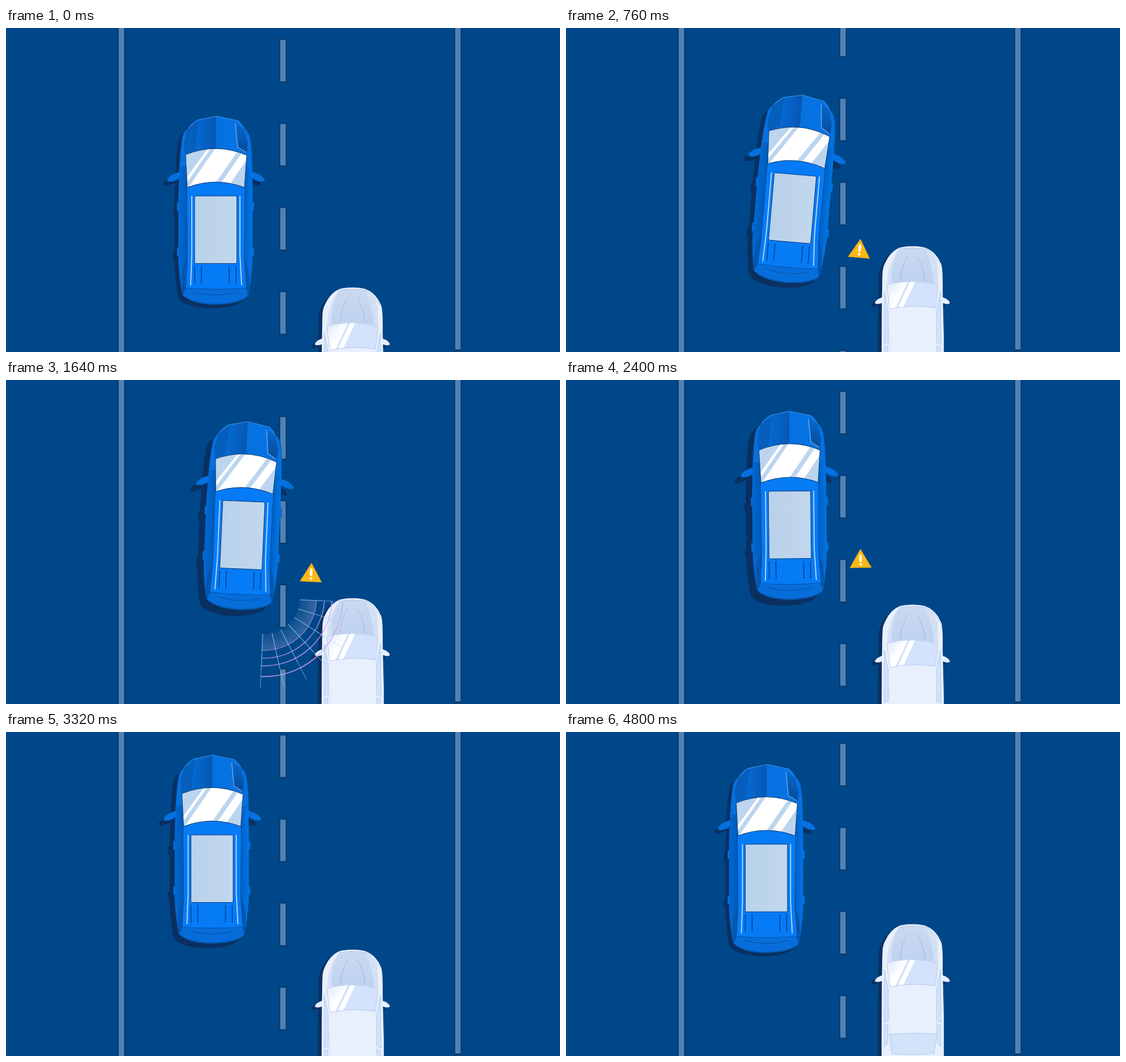
Animation of 978x573 px, one loop 4840 ms. Source, as an HTML page:

```html
<!DOCTYPE html>
<html lang="en">
<head>
<meta charset="utf-8">
<title>Lane warning</title>
<style>
html, body { margin: 0; width: 100%; height: 100%; overflow: hidden; background: #004789; }
svg { display: block; width: 978px; height: 573px; }
</style>
</head>
<body>
<svg viewBox="0 0 978 573" xmlns="http://www.w3.org/2000/svg">
  <defs>
    <linearGradient id="hoodL"><stop offset="0" stop-color="#0872e2"/><stop offset=".35" stop-color="#0569d2"/><stop offset="1" stop-color="#0558b4"/></linearGradient>
    <linearGradient id="hoodR"><stop offset="0" stop-color="#0670de"/><stop offset="1" stop-color="#0875e8"/></linearGradient>
    <linearGradient id="lamp" x1="0" y1="0" x2="0" y2="1"><stop offset="0" stop-color="#0768cf"/><stop offset="1" stop-color="#064b96"/></linearGradient>
    <linearGradient id="side"><stop offset="0" stop-color="#0069d4"/><stop offset=".13" stop-color="#0058b4"/><stop offset=".87" stop-color="#005cbc"/><stop offset="1" stop-color="#0074e6"/></linearGradient>
    <linearGradient id="glass"><stop offset="0" stop-color="#b8d1ea"/><stop offset="1" stop-color="#c1d7ed"/></linearGradient>
    <linearGradient id="bonnet" x1="0" y1="0" x2="0" y2="1"><stop offset="0" stop-color="#cad9f1"/><stop offset="1" stop-color="#bfd2ee"/></linearGradient>
    <linearGradient id="shine" x1="0" y1="0" x2=".55" y2=".55"><stop offset=".15" stop-color="#d6e4fb"/><stop offset="1" stop-color="#fff"/></linearGradient>
    <clipPath id="screen"><path d="M317 224Q371 202 425 225L421 282Q370 263 320 282Z"/></clipPath>
    <clipPath id="screen2"><path d="M566 408Q612 396 657 409L652 449Q612 442 572 451Z"/></clipPath>

    <path id="mirror" d="M317 247C313 254 306 254 299 257C289 260 283 268 285 271C293 274 305 268 309 263L318 261Z"/>
    <path id="body" d="M371 155.500L338 162Q325 169 321 178Q314 182 311 194Q307 220 306 250L304.500 300V410Q306 446 312 472Q326 488 369 489Q413 488 427 474Q433 447 435 410V300L434.500 250Q435 217 431 194Q428 182 421 178Q418 169 410 164Z"/>
    <path id="nub" d="M302 308h4v15h-4zM302 388h4v15h-4zM434 308h4v15h-4zM434 388h4v15h-4z"/>
    <g id="shape">
      <use href="#body"/><use href="#mirror"/><use href="#nub"/>
      <use href="#mirror" transform="translate(741.400) scale(-1 1)"/>
    </g>

    <path id="mirror2" d="M561 430C552 432 545 437 546 441C552 443 557 440 561 439Z"/>
    <path id="body2" d="M590 342.500Q612 338 633 342.500Q653 349 662 372Q665 380 664.500 420L666.500 500L667 700H557L558 440L559 391Q559 378 564 369Q573 349 590 342.500Z"/>
    <g id="shape2">
      <use href="#body2"/><use href="#mirror2"/>
      <use href="#mirror2" transform="translate(1223) scale(-1 1)"/>
    </g>
  </defs>

  <rect width="978" height="573" fill="#004789"/>
  <g fill="#5083b5" stroke="#0d3768" stroke-width="2">
    <rect x="198" y="-5" width="11.500" height="585"/>
    <rect x="792" y="-5" width="11.500" height="574.500"/>
    <g id="dashes"></g>
  </g>

  <g id="white">
    <use href="#shape2" x="-7" y="5" fill="#0a3062"/>
    <use href="#shape2" fill="#e8effd" stroke="#f3f7fe" stroke-width=".8"/>
    <path d="M588 345Q612 341 636 345Q650 353 656 372L657 409Q612 396 567 408L568 391Q574 362 588 345Z" fill="#d3e0f4"/>
    <path d="M588 345Q612 341 634 345Q646 370 650 406Q612 397 575 405Q573 374 588 345Z" fill="url(#bonnet)"/>
    <path d="M588 345Q612 341 636 345Q650 352 659 370" fill="none" stroke="#b2c8e8"/>
    <path d="M603 358Q591 378 590 402M620 358Q632 378 634 402" fill="none" stroke="#9fb9df"/>
    <g clip-path="url(#screen2)">
      <path d="M560 395h110v60h-110z" fill="#d3e2fd"/>
      <path d="M560 395h47l-28 60h-19z" fill="url(#shine)"/>
      <path d="M611 395h9l-28 60h-9z" fill="#fff"/>
    </g>
    <g stroke="#a9c3e8" stroke-width=".8" fill="#d2e2f9">
      <path d="M566 408Q612 396 657 409L652 449Q612 442 572 451Z" fill="none"/>
      <path d="M562 420L569 457V510L562 514ZM661 420L654 457V510L662 514ZM562 518L568 516V550L562 557ZM661 518L655 516V550L662 557Z"/>
      <path d="M571 535Q612 531 654 534L650 568Q612 573 575 569Z"/>
      <path d="M569 457L571 535M654 457V534" fill="none" stroke="#ccdcf3"/>
    </g>
  </g>

  <use id="shadow" href="#shape" fill="#0a3062"/>
  <g id="blue">
    <use href="#shape" fill="#0570df" stroke="#07549f" stroke-width=".8"/>
    <path d="M306 245L304.500 300V410Q306 446 312 472L427 474Q433 446 435 410V300L434.500 245Z" fill="url(#side)"/>
    <path d="M338 163L371 155.500V214Q345 214 318 224L315 203L322 178Z" fill="url(#hoodL)"/>
    <path d="M371 155.500L410 164L421 178L427 205L425 225Q397 214 371 214Z" fill="url(#hoodR)"/>
    <path d="M338 165L333 215L317 222L315 203L322 178Z" fill="#075fbd" stroke="#054d9b" stroke-width=".7"/>
    <path d="M405 168L409 212L425 222L427 204L420 178Z" fill="url(#lamp)"/>
    <path d="M405 169L409 211L424 220" fill="none" stroke="#78b5f4" stroke-width="1.200"/>
    <path d="M321 178L338 163L371 156L410 164L421 178" fill="none" stroke="#4f9eee" stroke-width=".8"/>
    <path d="M319 278Q370 263 422 278L421 410L425 462H317L320 410Z" fill="#057bf6" stroke="#064d9c"/>
    <g clip-path="url(#screen)">
      <path d="M310 205h120v85h-120z" fill="#fff"/>
      <path d="M310 205h52L310 277zM367 205h8L322 282h-9zM418 205h9L373 284h-10zM444 205L386 290H444z" fill="#bcd5ef"/>
    </g>
    <path d="M317 224Q371 202 425 225L421 282Q370 263 320 282Z" fill="none" stroke="#0a3568"/>
    <path d="M328 297V400L326 455M413 297V400L416 455" fill="none" stroke="#b9dcff" stroke-width="1.800"/>
    <rect x="333" y="297" width="74.500" height="119.500" rx="2" fill="url(#glass)" stroke="#0b3a74"/>
    <path d="M333 421V452M345 421V452M394 421V452M406 421V452" stroke="#064088" stroke-width="1.500"/>
    <path d="M319 410L317 458L312 468Q311 440 313 428ZM422 410L425 458L428 468Q430 440 427 428Z" fill="#0757ac" stroke="#064b96" stroke-width=".7"/>
    <path d="M318 460Q370 464 424 460L427 474Q413 486 369 488Q326 486 312 472Z" fill="#076ddb" stroke="#064f9f" stroke-width=".8"/>
    <path d="M331 467Q370 478 409 467" fill="none" stroke="#064f9f"/>
  </g>

  <g id="extras">
    <g id="sensor" fill="none"></g>
    <g id="sign">
      <path d="M494.500 401.500L513 433.500H476Z" fill="#fdb813" stroke="#fdb813" stroke-linejoin="round"/>
      <path d="M494.500 412.500V421.500" stroke="#fff" stroke-width="4.500" stroke-linecap="round"/>
      <circle cx="494.500" cy="428" r="2.400" fill="#fff"/>
    </g>
  </g>
</svg>
<script>
const LOOP = 4840, STEP = 40, GAP = 148.7;
const $ = id => document.getElementById(id);

function add(parent, tag, attrs) {
  const el = document.createElementNS('http://www.w3.org/2000/svg', tag);
  for (const k in attrs) el.setAttribute(k, attrs[k]);
  return parent.appendChild(el);
}

for (let i = -1; i < 4; i++)
  add($('dashes'), 'rect', { x: 483.2, y: 20 + i * GAP, width: 11.5, height: 75.5 });

// Sensor fan: a quarter circle behind the rear right corner
const CX = 413.8, CY = 466.7;
const arc = (r, stroke, width, opacity) => add($('sensor'), 'path', {
  d: `M${CX + r} ${CY}A${r} ${r} 0 0 1 ${CX} ${CY + r}`,
  stroke, 'stroke-width': width, 'stroke-opacity': opacity
});
for (let i = 0; i < 7; i++) arc(65 + i * 4, '#9aa8cf', 4, 0.1 + i * 0.035);
[92, 106, 119.5, 138.5].forEach((r, i) => arc(r, '#d3a0f4', 1.5, 0.65 + i * 0.1));
for (let i = 0; i < 7; i++) {
  const a = i * Math.PI / 12, c = Math.cos(a), s = Math.sin(a), end = i ? 160 : 122;
  const part = (end - 63) / 3;
  for (let n = 0; n < 3; n++) {
    const r = 63 + n * part;
    add($('sensor'), 'line', {
      x1: CX + r * c, y1: CY + r * s, x2: CX + (r + part) * c, y2: CY + (r + part) * s,
      stroke: '#a3d4f7', 'stroke-width': 1, 'stroke-opacity': n === 2 ? 0.6 : 0.85
    });
  }
}

const times = [0, 760, 1640, 2400, 3320, 3920, 4800];
const keys = {
  x: [370, 402.5, 418.5, 394.5, 363.5, 356.5, 353.5],
  y: [322.5, 284.5, 240, 222, 207.5, 210.8, 224],
  turn: [0, 4.9, 2.5, -0.6, 0, 0, 0],
  lift: [7, 9, 11.5, 11.5, 9, 8.5, 6.5],
  white: [459, 386, 386, 397.5, 385, 368.5, 340]
};

// Smooth curve through the keys, without overshoot
function curve(v, t) {
  const last = times.length - 1;
  const rate = i => (v[i + 1] - v[i]) / (times[i + 1] - times[i]);
  const slope = i => {
    if (i === 0) return rate(0);
    if (i === last) return rate(last - 1);
    const a = rate(i - 1), b = rate(i);
    return a * b <= 0 ? 0 : 2 * a * b / (a + b);
  };
  let i = 0;
  while (i < last - 1 && t > times[i + 1]) i++;
  const h = times[i + 1] - times[i], u = (t - times[i]) / h, w = 1 - u;
  return v[i] * w * w * (1 + 2 * u) + v[i + 1] * u * u * (3 - 2 * u)
    + h * u * w * (slope(i) * w - slope(i + 1) * u);
}

const ramp = (t, a, b) => Math.min(1, Math.max(0, (t - a) / (b - a)));
const fade = (t, a, b, d) => ramp(t, a, a + d) * (1 - ramp(t, b, b + d));
const move = (id, value) => $(id).setAttribute('transform', value);

function draw(ms) {
  const t = Math.floor((ms % LOOP) / STEP) * STEP;
  const at = name => curve(keys[name], t);
  const phase = (t / STEP * 3 % 10) / 10;
  const lift = at('lift');
  const pose = `translate(${at('x')} ${at('y')}) rotate(${at('turn')}) translate(-370 -322.5)`;
  move('dashes', `translate(0 ${phase * GAP})`);
  move('white', `translate(0 ${at('white') - 340})`);
  move('shadow', `translate(${-lift} ${lift * 0.95}) ${pose}`);
  move('blue', pose);
  move('extras', pose);
  $('sign').setAttribute('opacity', fade(t, 480, 2640, 160));
  $('sensor').setAttribute('opacity', fade(t, 1000, 1880, 240));
}

const start = performance.now();
function tick() {
  draw(performance.now() - start);
  requestAnimationFrame(tick);
}
tick();
</script>
</body>
</html>
```
